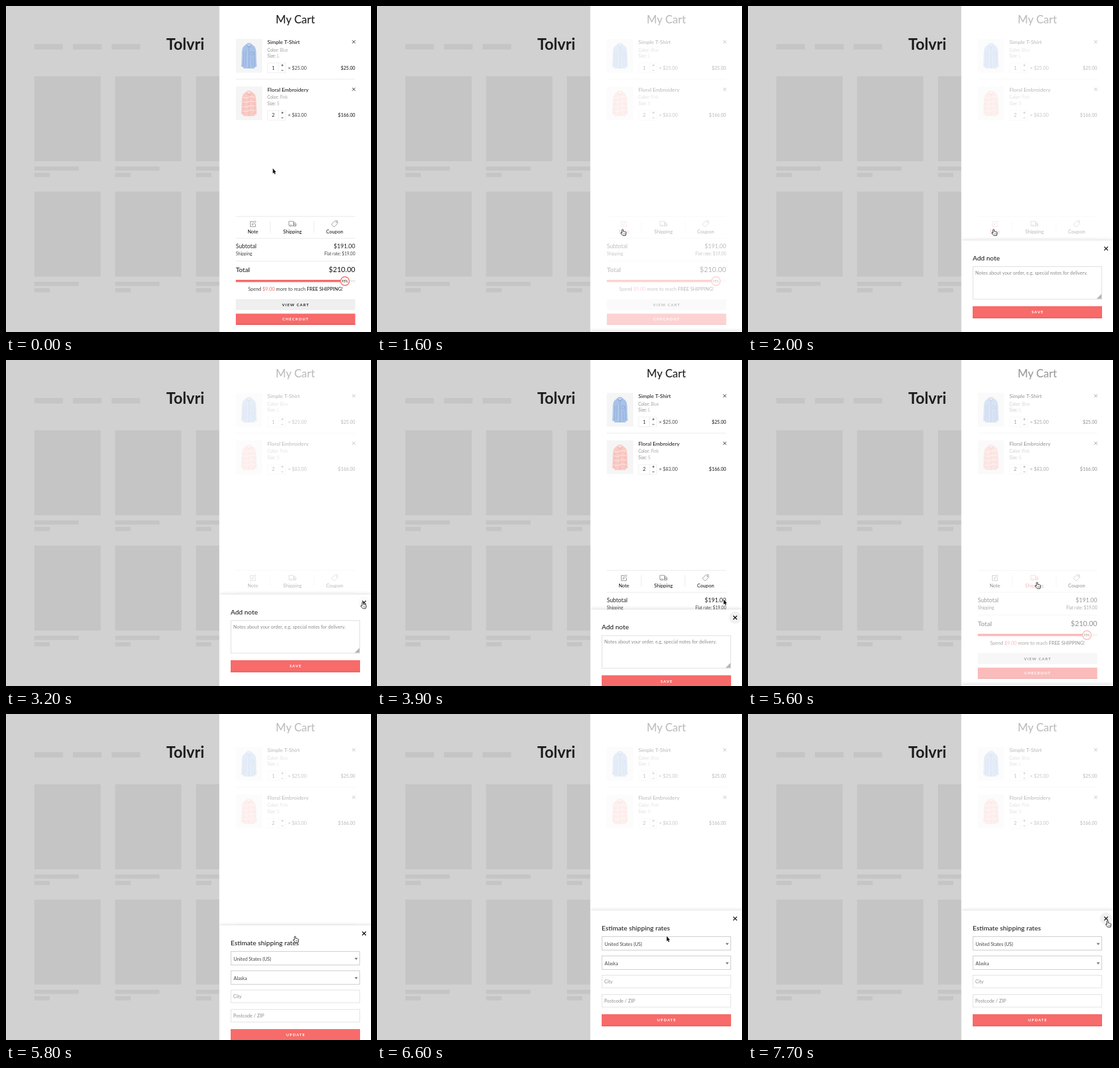
An HTML page with a canvas for the animation above (8 s loop, 567 px wide and 506 px high).

```html
<!DOCTYPE html>
<html lang="en">
<head>
<meta charset="utf-8">
<title>Cart drawer</title>
<style>
  html, body { margin: 0; width: 100%; height: 100%; overflow: hidden; background: #d1d1d1; }
  canvas { display: block; width: 567px; height: 506px; }
</style>
</head>
<body>
<canvas id="stage"></canvas>
<script>
const W = 567, H = 506, LOOP = 8000;
const LEFT = 357, RIGHT = 542.5, MID = 449.5;
const RED = '#f76b6a', INK = '#222', RULE = '#ececec';
const canvas = document.getElementById('stage');
const dpr = window.devicePixelRatio || 1;
canvas.width = W * dpr;
canvas.height = H * dpr;
const c = canvas.getContext('2d');

// Timing helpers
const ramp = (t, a, b) => Math.min(1, Math.max(0, (t - a) / (b - a)));
const smooth = p => (1 - Math.cos(Math.PI * p)) / 2;
const easeOut = p => 1 - Math.pow(1 - p, 3.1);
const within = (t, spans) => spans.some(([a, b]) => t >= a && t < b);

function mix(from, to, p) {
  return `rgb(${from.map((v, i) => Math.round(v + (to[i] - v) * p)).join(',')})`;
}

// Drawing helpers
function box(x1, y1, x2, y2, color) {
  c.fillStyle = color;
  c.fillRect(x1, y1, x2 - x1, y2 - y1);
}

function frame(x1, y1, x2, y2, color) {
  c.strokeStyle = color;
  c.lineWidth = 1;
  c.strokeRect(x1 + .5, y1 + .5, x2 - x1 - 1, y2 - y1 - 1);
}

function text(str, x, y, size, { color = INK, weight = 400, align = 'left', gap = 0 } = {}) {
  c.font = `${weight} ${size}px Lato, sans-serif`;
  c.letterSpacing = gap + 'px';
  c.textAlign = align;
  c.fillStyle = color;
  c.fillText(str, x + (align === 'center' ? gap / 2 : 0), y);
  const width = c.measureText(str).width;
  c.letterSpacing = '0px';
  return width;
}

function cross(x, y, r, width, color = INK) {
  line(`M${x - r} ${y - r}L${x + r} ${y + r}M${x + r} ${y - r}L${x - r} ${y + r}`, color, width);
}

function line(d, color, width) {
  c.strokeStyle = color;
  c.lineWidth = width;
  c.stroke(new Path2D(d));
}

function fill(d, color) {
  c.fillStyle = color;
  c.fill(new Path2D(d));
}

function at(x, y, draw) {
  c.save();
  c.translate(x, y);
  draw();
  c.restore();
}

function disc(x, y, r, color) {
  c.beginPath();
  c.arc(x, y, r, 0, 7);
  c.fillStyle = color;
  c.fill();
}

function button(x1, y1, x2, y2, label) {
  box(x1, y1, x2, y2, RED);
  box(x1, y2 - 1.5, x2, y2, '#de5f5f');
  text(label, MID, (y1 + y2) / 2 + 2, 6, { color: '#fff', weight: 700, align: 'center', gap: 1.1 });
}

// Shop page behind the drawer
function shop() {
  box(0, 0, W, H, '#d1d1d1');
  box(0, 0, 1, H, '#dadada');
  const grey = '#c5c5c5';
  for (const x of [44, 104, 164]) box(x, 59, x + 44.5, 67.5, grey);
  for (const y of [109, 288]) {
    for (const x of [44, 169.5, 295]) {
      box(x, y, x + 103, y + 132, grey);
      box(x, y + 140, x + 69, y + 146.5, grey);
      box(x, y + 150, x + 24, y + 156.5, grey);
    }
  }
  text('Tolvri', 249, 68, 24, { weight: 700, color: '#1c1c1c' });
}

function shirt(main, dark, light, lace) {
  fill('M17 8L24 8L28 11Q31 13 31.500 20L32.500 43L29.500 44L29 46H12L11.500 44L8.500 43L9.500 20Q10 13 13 11Z', main);
  line('M12.500 20L11.700 43M28.500 20L29.300 43M20.500 11V46', dark, .6);
  fill('M16.500 8L20.500 12L24.500 8L23 6.500H18Z', light);
  line('M16.500 8L19 13L20.500 11L22 13L24.500 8M18 7Q20.500 9 23 7', dark, .6);
  if (lace) {
    for (let y = 17; y < 45; y += 7) line(`M11 ${y}Q16 ${y + 2} 20 ${y}T30 ${y}`, light, 1.3);
  } else {
    line('M23 20H27V25H23ZM16 18L15 42M25 28L26 43', dark, .5);
    line('M18 18V43M10.500 25L10 40M31 25L31.500 40', light, .6);
  }
}

function item(y, { name, color, size, count, price, sum, cloth }) {
  box(LEFT, y, 398, y + 52.5, '#f5f5f5');
  at(LEFT, y, () => shirt(...cloth));
  text(name, 406, y + 8, 8.2, { weight: 500 });
  const w = text('Color: ', 406, y + 19.5, 6.6, { color: '#999', weight: 500 });
  text(color, 406 + w, y + 19.5, 6.6, { color: '#b0b0b0' });
  const v = text('Size: ', 406, y + 29, 6.6, { color: '#999', weight: 500 });
  text(size, 406 + v, y + 29, 6.6, { color: '#b0b0b0' });
  frame(406, y + 37, 435, y + 53, '#f0f0f0');
  box(423, y + 37, 424, y + 53, '#f0f0f0');
  text(count, 415, y + 47.5, 7.3, { align: 'center' });
  line(`M427.500 ${y + 41}h3.500m-1.750 -1.750v3.500M427.500 ${y + 49}h3.500`, '#444', .8);
  text('× ' + price, 438, y + 47.5, 7.3, { color: '#444' });
  text(sum, RIGHT, y + 47.5, 7.2, { weight: 500, align: 'right' });
  cross(540.2, y + 4.6, 2.4, .9);
}

const items = [
  { name: 'Simple T-Shirt', color: 'Blue', size: 'L', count: '1', price: '$25.00', sum: '$25.00',
    cloth: ['#a9c2e8', '#7f9fd0', '#c3d5f0', false] },
  { name: 'Floral Embroidery', color: 'Pink', size: 'S', count: '2', price: '$83.00', sum: '$166.00',
    cloth: ['#f9c9c4', '#efa9a4', '#fde2de', true] }
];

const tabs = [
  { x: 383.5, label: 'Note', icon: 'M1 -3.500H-4V4.500H4V0M-1.500 2L-1 -.200L3.300 -4.500L4.800 -3L.500 1.300Z' },
  { x: 445, label: 'Shipping', icon: 'M-4 3H-5.500V-3.800H1.500V3H-1.300M1.500 -2H4L5.700 .500V3H4.700M1.500 3H2M2.500 -1V.700H5.500' +
    'M-4 3a1.350 1.350 0 1 0 2.700 0a1.350 1.350 0 1 0 -2.700 0M2 3a1.350 1.350 0 1 0 2.700 0a1.350 1.350 0 1 0 -2.700 0' },
  { x: 510.5, label: 'Coupon', icon: 'M0 -4L4.300 -4.700L4.700 -.500L-.800 5L-5 .800ZM2.300 -2.500h.800v.800h-.800Z' }
];

function cart(hover) {
  box(331.5, 0, W, H, '#fff');
  text('My Cart', MID, 27, 17, { weight: 500, align: 'center' });
  items.forEach((it, i) => item(51 + 73.7 * i, it));
  box(LEFT, 113, RIGHT, 114, RULE);

  for (const y of [326, 360, 395.5]) box(LEFT, y, RIGHT, y + 1, RULE);
  for (const x of [410, 478]) box(x, 334, x + 1, 352, RULE);
  tabs.forEach(({ x, label, icon }, i) => {
    at(x, 338, () => line(icon, mix([125, 125, 125], [247, 160, 160], hover[i]), .75));
    text(label, x, 353, 7.6, { weight: 500, align: 'center', color: mix([34, 34, 34], [240, 115, 115], hover[i]) });
  });

  text('Subtotal', LEFT, 376, 8.8);
  text('$191.00', RIGHT, 376, 9, { align: 'right' });
  text('Shipping', LEFT, 387, 6.8, { color: '#444' });
  text('Flat rate: $19.00', RIGHT, 387, 6.6, { color: '#444', align: 'right' });
  text('Total', LEFT, 413, 10.2, { weight: 500 });
  text('$210.00', RIGHT, 413, 11.1, { weight: 500, align: 'right' });

  box(LEFT, 425, RIGHT, 428.5, '#eee');
  box(LEFT, 425, 520, 428.5, RED);
  disc(526.5, 427, 7.4, RED);
  disc(526.5, 427, 6.1, '#fff');
  text('95%', 526.5, 428.7, 4.8, { weight: 500, align: 'center' });

  let x = 376;
  for (const [str, color, weight] of [
    ['Spend ', '#444', 400], ['$9.00', RED, 400], [' more to reach ', '#444', 400], ['FREE SHIPPING!', INK, 500]
  ]) x += text(str, x, 441.7, 7.5, { color, weight });

  box(LEFT, 455, RIGHT, 472, '#efefef');
  text('VIEW CART', MID, 465.7, 6, { weight: 700, align: 'center', gap: 1.1 });
  button(LEFT, 477.5, RIGHT, 495, 'CHECKOUT');
}

// Sliding sheets, laid out from their own top edge
function sheet(top, title, hover, body) {
  if (top >= H) return;
  at(0, top, () => {
    c.save();
    c.beginPath();
    c.rect(331.5, -20, W, 540);
    c.clip();
    c.shadowColor = 'rgba(0,0,0,.18)';
    c.shadowBlur = 6 * dpr;
    box(331.5, 0, W, 300, '#fff');
    c.restore();
    if (hover) {
      c.globalAlpha = hover;
      disc(556.3, 12.5, 9.5, '#f1f1f1');
      c.globalAlpha = 1;
    }
    cross(556.3, 12.5, 2.9, 1.3, '#111');
    text(title, 349, 30.5, 10.4, { weight: 500 });
    body();
  });
}

function noteForm() {
  frame(349, 40, 550, 91.5, '#e0e0e0');
  text('Notes about your order, e.g. special notes for delivery.', 353, 53, 7.4, { color: '#8c8c8c' });
  fill('M549 83V90.500H541.500Z', '#b5b5b5');
  button(349, 102, 550, 120.5, 'SAVE');
}

function rateForm() {
  ['United States (US)', 'Alaska'].forEach((value, i) => {
    const y = 40 + 30 * i;
    frame(349, y, 550, y + 22, '#cfcfcf');
    text(value, 353.5, y + 14.5, 7.3, { color: '#444' });
    fill(`M541.500 ${y + 10.5}h5l-2.500 3.200Z`, '#777');
  });
  ['City', 'Postcode / ZIP'].forEach((hint, i) => {
    const y = 100 + 30 * i;
    frame(349, y, 550, y + 20.5, '#e3e3e3');
    text(hint, 353, y + 13.2, 7.4, { color: '#8c8c8c' });
  });
  button(349, 161, 550, 179.5, 'UPDATE');
}

// Pointer: start point, then legs of [from, to, x, y]
const legs = [
  [40, 600, 381.5, 346.5],
  [2350, 3200, 554, 376],
  [3700, 4500, 449, 345],
  [6550, 7400, 558.5, 321]
];
const handSpans = [[520, 2400], [3100, 3720], [4350, 6600], [7250, LOOP]];

function pointer(t) {
  let x = 414.5, y = 252;
  for (const [a, b, nx, ny] of legs) {
    const p = smooth(ramp(t, a, b));
    x += (nx - x) * p;
    y += (ny - y) * p;
  }
  at(x, y, () => {
    c.lineJoin = 'round';
    if (within(t, handSpans)) {
      const hand = 'M-1 1Q-1 0 0 0T1 1V3.500Q2.200 2.800 2.700 3.800Q3.900 3.200 4.300 4.300Q5.600 4 5.600 5.400Q5.600 7.500 4.700 9.800H.300L-2.800 6.300Q-3.200 5 -1.900 5.200L-1 6Z';
      fill(hand, '#fff');
      line(hand, '#222', .9);
      line('M1.300 6.200V8M2.700 6.200V8M4 6.200V8', '#333', .5);
    } else {
      const arrow = 'M0 0V8L1.700 6.500L2.900 9.200L4.200 8.600L3 6H5.200Z';
      line(arrow, '#fff', 1.2);
      fill(arrow, '#111');
    }
  });
}

function draw(t) {
  c.setTransform(dpr, 0, 0, dpr, 0, 0);
  c.lineJoin = 'miter';
  shop();
  const noteHover = ramp(t, 480, 700) - ramp(t, 2400, 2550);
  const shipHover = ramp(t, 4430, 4700) - ramp(t, 6600, 6750);
  cart([noteHover, shipHover, 0]);

  const veil = ramp(t, 1350, 1590) - ramp(t, 3650, 3880) + ramp(t, 5430, 5650);
  box(331.5, 0, W, H, `rgba(255,255,255,${.7 * veil})`);

  const noteOpen = easeOut(ramp(t, 1600, 2000)) - smooth(ramp(t, 3800, 4180));
  const rateOpen = easeOut(ramp(t, 5600, 6000));
  sheet(H - 142 * noteOpen, 'Add note', ramp(t, 3150, 3350), noteForm);
  sheet(H - 201 * rateOpen, 'Estimate shipping rates', ramp(t, 7350, 7600), rateForm);
  pointer(t);
}

const start = performance.now();
function tick() {
  draw((performance.now() - start) % LOOP);
  requestAnimationFrame(tick);
}
tick();
</script>
</body>
</html>
```
